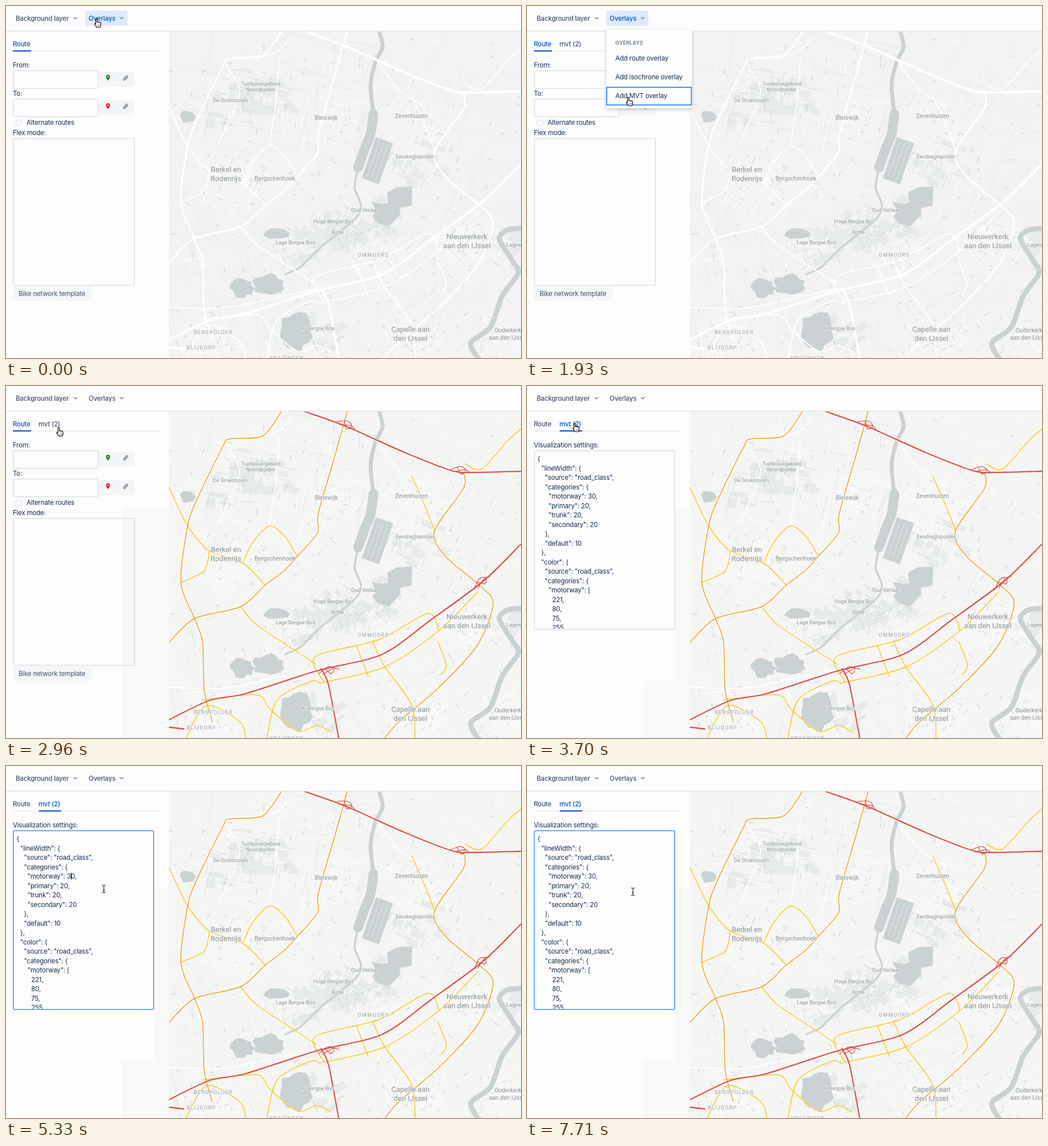
An HTML page that plays this animation: 904x619 px, repeating every 8 s.

```html
<!DOCTYPE html>
<html lang="en">
<head>
<meta charset="utf-8">
<title>Map overlays</title>
<style>
html, body { margin: 0; width: 100%; height: 100%; overflow: hidden; background: #fdfdfe; }
svg { display: block; width: 904px; height: 619px; }
text { font-family: Inter, "Open Sans", sans-serif; font-size: 11.5px; letter-spacing: -.18px; fill: #172b4d; white-space: pre; }
.nav { font-weight: 500; fill: #42526e; }
.heading { font-size: 9px; font-weight: 600; letter-spacing: .15px; fill: #6b778c; }
.place { font-family: Roboto, "Noto Sans", sans-serif; letter-spacing: 0; fill: #8b9495; stroke: #f5f6f5; stroke-width: 1.6px; paint-order: stroke; text-anchor: middle; }
.district { font-size: 9px; letter-spacing: 1.3px; fill: #9da5a6; }
</style>
</head>
<body>
<svg id="stage" viewBox="0 0 904 619"></svg>
<script>
const LOOP = 8000, BEATS = 54;

// ---------- helpers ----------
const path = (d, attrs) => `<path d="${d}" ${attrs}/>`;
const rect = (x, y, w, h, attrs) => `<rect x="${x}" y="${y}" width="${w}" height="${h}" ${attrs}/>`;
const text = (x, y, s, attrs = '') => `<text x="${x}" y="${y}" ${attrs}>${s}</text>`;
const group = (id, body, attrs = '') => `<g id="${id}" ${attrs}>${body}</g>`;
const stroke = (color, width) => `fill="none" stroke="${color}" stroke-width="${width}" stroke-linejoin="round" stroke-linecap="round"`;

let seed = 11;
const random = () => (seed = (seed * 16807) % 2147483647) / 2147483647;
const spread = r => (random() * 2 - 1) * r;

// Catmull-Rom curve through "x,y x,y ..."
function curve(s) {
  const p = s.split(' ').map(q => q.split(',').map(Number));
  const at = i => p[Math.max(0, Math.min(p.length - 1, i))];
  let d = `M${p[0]}`;
  for (let i = 0; i < p.length - 1; i++) {
    const handle = (a, b, c) => [0, 1].map(k => a[k] + (b[k] - c[k]) / 7);
    d += `C${handle(at(i), at(i + 1), at(i - 1))} ${handle(at(i + 1), at(i), at(i + 2))} ${at(i + 1)}`;
  }
  return d;
}
const curves = list => list.map(curve).join('');

function blob(cx, cy, rx, ry, points = 18) {
  let d = '';
  for (let i = 0; i < points; i++) {
    const a = i / points * Math.PI * 2, r = 1 + spread(.2);
    d += `${i ? 'L' : 'M'}${cx + rx * r * Math.cos(a)} ${cy + ry * r * Math.sin(a)}`;
  }
  return d + 'Z';
}

// ---------- map ----------
// Direction of the street and field grid at a point, in radians.
function grain(x, y) {
  const degrees = y > 400 ? -10 - (x - 286) / 18 : x > 640 ? 26 : y > 240 ? 32 : 12;
  return (degrees + spread(4)) * Math.PI / 180;
}
function dash(x, y, length) {
  const a = grain(x, y) + (random() < .5 ? Math.PI / 2 : 0);
  return `M${x} ${y}l${length * Math.cos(a)} ${length * Math.sin(a)}`;
}
function patch(x, y, w, h) {
  const a = grain(x, y), c = Math.cos(a), s = Math.sin(a);
  return `M${x} ${y}l${w * c} ${w * s}l${-h * s} ${h * c}l${-w * c} ${-w * s}z`;
}
const repeat = (n, make) => Array.from({ length: n }, make).join('');
const anywhere = (n, min, max) => repeat(n, () => dash(286 + random() * 618, 45 + random() * 574, min + random() * (max - min)));
const around = (spots, n, r, make) => spots.map(([, x, y]) => repeat(n, () => make(x + spread(r), y + spread(r * .8)))).join('');

const towns = [
  ['Berkel en', 386, 292], ['Rodenrijs', 386, 308], ['Nieuwerkerk', 809, 410],
  ['aan den IJssel', 809, 426], ['Capelle aan', 710, 573], ['den IJssel', 710, 589]
];
const villages = [
  ['Bleiswijk', 562, 200], ['Zevenhuizen', 712, 197], ['Bergschenhoek', 472, 307],
  ['Ouderkerk', 881, 574], ['aan den IJssel', 881, 587]
];
const parks = [
  ['Tuinbouwgebied', 447, 140], ['Noordpolder', 447, 150], ['De Groenzoom', 394, 169],
  ['Eendragtspolder', 718, 268], ['Oud Verlaat', 630, 362], ['Hoge Bergse Bos', 575, 382],
  ['Rotte', 582, 401], ['Lage Bergse Bos', 508, 419], ['Kralingse Bos', 548, 570], ['Lagew', 892, 423]
];
const districts = [['OMMOORD', 645, 441], ['BERGPOLDER', 364, 577], ['BLIJDORP', 343, 604], ['KRALINGEN', 493, 623]];
const built = [...towns, ...villages, ...districts];

const motorways = [
  '522,44 597,71 700,117 783,149 820,152 904,150',
  '904,278 838,343 746,411 660,472 545,501 420,541 357,553 286,587',
  '553,497 566,525 584,619',
  '286,600 312,603'
];
const primary = [
  '484,44 450,88 392,93 379,110 335,200 319,246 307,345 331,409 345,450 348,535 362,590',
  '599,44 578,120 548,225 547,258 511,300 488,325 455,350 412,388 331,409 286,451',
  '803,152 803,180 752,256 772,300 828,348 855,382 828,455 760,530 690,590 665,619'
];
const secondary = [
  '286,178 319,246 357,290 416,312 455,350',
  '357,290 348,325 308,345',
  '416,310 433,275 463,246 490,265 510,297',
  '712,158 735,210 753,256',
  '904,75 880,97 835,146 806,137',
  '412,388 440,420 515,470 544,489',
  '558,520 543,476 655,446 740,400 760,430',
  '553,522 665,494 760,430 828,362',
  '615,456 636,511',
  '643,448 665,494 712,560 718,619',
  '758,450 773,490 764,508',
  '345,552 440,543 463,568 512,607 546,597 572,609',
  '552,524 535,519 476,552 458,619',
  '316,619 352,562 410,590 421,619'
];
const minor = ['500,58 467,85 388,96 410,152 372,245', '480,94 472,180 462,246', '650,95 690,148 735,176', '286,530 390,530 545,497'];

// A small knot of slip roads turned along the motorway.
const junction = (x, y, angle) =>
  path('M-18-1L-6-7Q4-11 9-4Q11 2 2 5L-6-7M-12 2L9-4L18 1', `transform="translate(${x} ${y}) rotate(${angle})" ${stroke('#dd504b', 1.2)}`);

const lanes = `<g transform="translate(652 272) rotate(19)">` + rect(-16, -38, 32, 76, 'fill="#cad2d3"') +
  [-8, 0, 8].map(x => path(`M${x}-32V32`, stroke('#e3e8e7', 1))).join('') + '</g>';
const water = '#cad2d3';
const lakes =
  path(curve('645,190 640,225 630,250 618,284'), stroke(water, 17)) +
  path('M641 344L661 348L671 346L669 328L686 319L713 317L712 351L691 355L692 367L672 388L653 382L643 370L650 360Z', `fill="${water}"`) +
  path(blob(510, 572, 31, 33) + blob(460, 490, 28, 18) + blob(415, 496, 20, 16) + blob(318, 195, 13, 10, 9) + blob(476, 400, 22, 9, 9), `fill="${water}"`) +
  path(curve('655,44 661,72 648,100 640,140 645,190'), stroke(water, 7)) +
  path(curve('618,284 612,320 623,350 612,375 548,428 518,458 490,472'), stroke(water, 3.5)) +
  path(curve('904,391 880,394 866,410 890,450 899,470 871,510 850,565 816,592 828,619'), stroke(water, 9));

const casings = [[motorways, 4], [primary, 3], [secondary, 2.2], [minor, 1.8]];
const label = (spots, size) => spots.map(([s, x, y]) => text(x, y, s, `class="place" style="font-size:${size}px"`)).join('');

const map =
  rect(286, 45, 618, 574, 'id="land" fill="#f2f3f2"') +
  path(around(parks, 14, 44, (x, y) => patch(x, y, 6 + random() * 24, 4 + random() * 14)), 'fill="#e7ecea"') +
  path(anywhere(230, 20, 75), stroke('#e2e7e5', .7)) +
  path(around(built, 48, 52, (x, y) => dash(x, y, 8 + random() * 28)) + anywhere(170, 12, 50), stroke('#fdfdfd', 1)) +
  path(around(built, 10, 52, (x, y) => dash(x, y, 2 + random() * 5)) + anywhere(170, 2, 10), stroke('#d5dbda', 1.5)) +
  path(around(parks, 13, 42, (x, y) => dash(x, y, 5 + random() * 18)), stroke('#d5dbda', 1)) +
  lakes + lanes +
  casings.map(([list, w]) => path(curves(list), stroke('#fff', w))).join('') +
  group('roads',
    path(curves(secondary), stroke('#f4c51c', 1.5)) +
    path(curves(primary), stroke('#e6a01f', 1.5)) +
    path(curves(motorways), stroke('#dd504b', 2.3)) +
    junction(597, 70, 22) + junction(797, 150, 5) + junction(836, 346, -42) + junction(567, 502, -15)) +
  label(towns, 13) + label(villages, 10.4) + label(parks, 9.3) +
  districts.map(([s, x, y]) => text(x, y, s, 'class="place district"')).join('');

// ---------- interface ----------
const chevron = (x, id) => path(`M${x - 2.7} 20l2.7 2.7l2.7-2.7`, `id="${id}" ${stroke('#6b778c', 1.3)}`);
const border = 'fill="#fdfdfe" stroke="#dfe1e6" stroke-width="1.6" rx="2.5"';
const pin = (y, color) => `<g transform="translate(179 ${y})">` +
  path('M0 5.500C-1.500 2.500-3.500 1-3.500-1.500a3.500 3.500 0 0 1 7 0C3.500 1 1.500 2.500 0 5.500Z', `fill="${color}"`) +
  '<circle cy="-1.5" r="1.2" fill="#fff"/></g>';
const link = y => path('M-.5-1.800H-3a1.800 1.800 0 0 0 0 3.600H-1M.5 1.800H3a1.800 1.800 0 0 0 0-3.600H1M-2 0H2',
  `transform="translate(210 ${y}) rotate(-45)" ${stroke('#5e6c84', 1.2)}`);
const stop = (name, y, color) =>
  text(12, y, name) + rect(163, y + 8, 62.5, 26, 'fill="#f4f5f7" rx="2"') +
  rect(12.8, y + 5.8, 148.7, 31, border) + pin(y + 18, color) + link(y + 18.5);

const routePanel = stop('From:', 108, '#0b8a0b') + stop('To:', 158, '#f01818') +
  rect(17.5, 200.5, 10, 10, 'fill="#fff" stroke="#d5d9e0" rx="2"') +
  text(36, 209, 'Alternate routes') + text(12, 227, 'Flex mode:') +
  rect(12.8, 232.8, 212.4, 258.4, border) +
  rect(12, 492.5, 139, 26, 'fill="#f5f6f7" rx="3"') +
  text(22, 509.5, 'Bike network template', 'style="fill:#42526e"');

const source = 'road_class';
const settings = {
  lineWidth: { source, categories: { motorway: 30, primary: 20, trunk: 20, secondary: 20 }, default: 10 },
  color: { source, categories: { motorway: [221, 80, 75, 255] } }
};
const json = JSON.stringify(settings, null, 1).split('\n').slice(0, 19);
const overlayPanel = text(12, 108, 'Visualization settings:') +
  rect(12.8, 113.8, 246.4, 314.4, `id="editor" ${border}`) +
  group('json', json.map((s, i) => text(18.6 + s.search(/\S/) * 6.4, 132 + i * 16.5, s.trim())).join(''), 'clip-path="url(#editorClip)"') +
  path('M114.5 187.500V200', 'id="caret" stroke="#111"');

const menu = rect(139, 41, 150.5, 139, 'fill="#fefefe" rx="3" filter="url(#shadow)"') +
  text(155, 67.5, 'OVERLAYS', 'class="heading"') +
  rect(139, 142, 150.5, 33, 'id="hover" fill="#f2f3f5"') +
  rect(140, 143, 148.5, 31, `id="focus" ${stroke('#4596f7', 2)}`) +
  ['route', 'isochrone', 'MVT'].map((kind, i) => text(155, 96 + i * 33, `Add ${kind} overlay`)).join('');

const band = (id, x, y, w, h) => rect(x, y, w, h, `id="${id}" fill="#a59f88" opacity=".055"`);
const hand = path('M-3.500-6.500c0-1.600 2.400-1.600 2.400 0V-1.500c.4-1 2.200-.8 2.300.3c.5-.9 2-.6 2.200.5c.7-.7 2-.2 2 1.100v3c0 2.500-1 3-1.200 4.100H-1.700c-.4-1.600-2-2.600-3.600-5c-.9-1.400.6-2.300 1.800-1z',
  'fill="#fff" stroke="#111" stroke-width="1.2" stroke-linejoin="round"') + path('M-.2 3v2.500M1.600 3v2.500M3.300 3v2.500', stroke('#333', .6));
const beam = path('M-3-6.500Q0-6.500 0-5V5Q0 6.500-3 6.500M3-6.500Q0-6.500 0-5M3 6.500Q0 6.500 0 5M-1.500 1.800H1.500', stroke('#222', 1.1));

document.getElementById('stage').innerHTML = `<defs>
  <clipPath id="mapClip"><rect x="286" y="45" width="618" height="574"/></clipPath>
  <clipPath id="editorClip"><rect x="13" y="114" width="246" height="313"/></clipPath>
  <filter id="shadow" x="-10%" y="-10%" width="120%" height="125%"><feDropShadow dx="0" dy="2" stdDeviation="2.5" flood-color="#091e42" flood-opacity=".25"/></filter>
  </defs>` +
  rect(0, 0, 904, 619, 'fill="#fdfdfe"') +
  group('map', map, 'clip-path="url(#mapClip)"') +
  rect(0, 43.5, 904, 1.5, 'fill="#e1e3e6"') +
  text(17, 25.5, 'Background layer', 'class="nav"') + chevron(122, 'chevronA') +
  rect(139, 8, 74, 27, 'id="button" fill="#deebff" rx="3"') +
  text(145, 25.5, 'Overlays', 'id="buttonText" class="nav"') + chevron(203, 'chevronB') +
  rect(12, 78.3, 259, 1.7, 'fill="#ebecf0"') +
  text(12, 71, 'Route', 'id="routeTab" class="nav"') + text(57, 71, 'mvt (2)', 'id="mvtTab" class="nav"') +
  rect(12, 78, 32, 2, 'id="underline" fill="#0052cc"') +
  group('routePanel', routePanel) + group('overlayPanel', overlayPanel) + group('menu', menu) +
  band('bandTop', 204, 45, 85, 169) + band('bandMid', 204, 214, 56, 304) +
  group('bandRest', band('bandSide', 260, 214, 26, 304) + band('bandBase', 204, 518, 82, 101)) +
  group('hand', hand) + group('beam', beam);

// ---------- timeline, in beats ----------
const el = Object.fromEntries([...document.querySelectorAll('[id]')].map(e => [e.id, e]));
const show = (id, on) => { el[id].style.display = on ? '' : 'none'; };
const tint = (id, on) => { el[id].style.fill = on ? '#0052cc' : '#42526e'; };

// Pointer moves: first beat, last beat, destination.
const moves = [[1, 5, 180, 168], [14, 15, 224, 195], [18, 22, 86, 73], [25, 28, 132, 281], [29, 32, 114, 196], [35, 38, 186, 221]];
function pointerAt(beat) {
  let x = 161, y = 30;
  for (const [from, to, toX, toY] of moves) {
    const u = Math.max(0, Math.min(1, (beat - from) / (to - from)));
    const eased = 1 - (1 - u) ** 4;
    x += (toX - x) * eased;
    y += (toY - y) * eased;
  }
  return [x, y];
}

function render(t) {
  const beat = Math.floor((t + 12) / LOOP * BEATS);
  const between = (a, b) => beat >= a && beat < b;
  const active = beat < 18, loaded = beat >= 15, mvt = beat >= 23;
  const typing = beat >= 27, focused = beat >= 36;

  show('menu', between(1, 18));
  show('hover', between(3, 12));
  show('focus', beat >= 12);
  show('button', active);
  tint('buttonText', active);
  el.chevronB.setAttribute('stroke', active ? '#4c7fd0' : '#6b778c');

  show('roads', loaded);
  el.land.setAttribute('fill', loaded ? '#f5f6f4' : '#f2f3f2');
  show('bandTop', between(15, 18));
  show('bandMid', between(15, 23));
  show('bandRest', loaded);

  show('mvtTab', beat >= 13);
  tint('routeTab', !mvt);
  tint('mvtTab', beat >= 22);
  el.underline.setAttribute('x', mvt ? 57.5 : 12);
  el.underline.setAttribute('width', mvt ? 39.5 : 32);
  show('routePanel', !mvt);
  show('overlayPanel', mvt);
  el.editor.setAttribute('fill', typing && !focused ? '#ecedf1' : '#fdfdfe');
  el.editor.setAttribute('stroke', focused ? '#4596f7' : beat === 35 ? '#bccbe6' : '#dfe1e6');
  show('caret', between(34, 38) || between(42, 45) || between(48, 52));

  show('hand', !typing);
  show('beam', typing);
  el[typing ? 'beam' : 'hand'].setAttribute('transform', `translate(${pointerAt(beat)})`);
}

const start = performance.now();
function tick() {
  render((performance.now() - start) % LOOP);
  requestAnimationFrame(tick);
}
tick();
</script>
</body>
</html>
```
